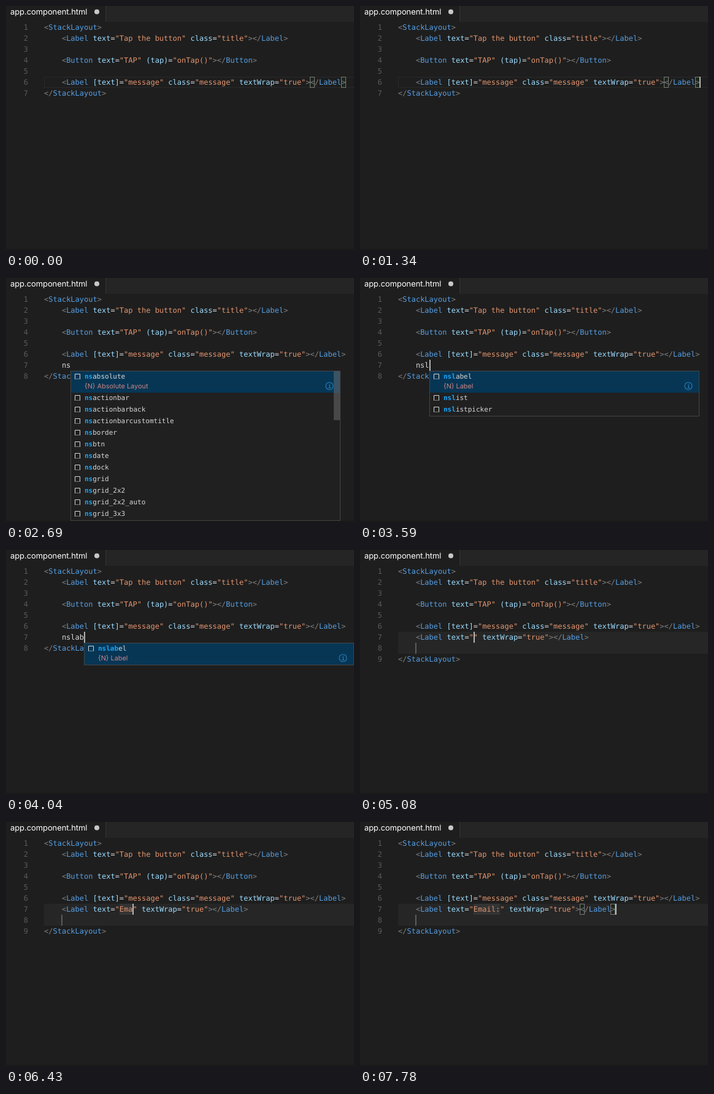
Recreate the animation shown at these times as an HTML page. Size 567 by 400 pixels, loop 8000 ms.

```html
<!DOCTYPE html>
<html lang="en">
<head>
<meta charset="utf-8">
<title>Editor snippet</title>
<style>
  html, body { margin: 0; width: 100%; height: 100%; overflow: hidden; background: #1e1e1e; }
  svg { display: block; width: 567px; height: 400px; }
  text { white-space: pre; text-rendering: geometricPrecision; }
  .code { font: 12px "DejaVu Sans Mono", monospace; }
  .item { font: 11px "DejaVu Sans Mono", monospace; fill: #d6d6d6; }
  .ui { font-family: Inter, sans-serif; }
  .num { fill: #5a5a5a; text-anchor: end; }
  .hit { fill: #18a3f6; font-weight: bold; }
</style>
</head>
<body>
<svg id="stage" viewBox="0 0 567 400"></svg>
<script>
const LOOP = 8000, LEFT = 62, TOP = 26, CHAR = 7.224, ROW = 18;
const COLORS = { punct: '#808080', tag: '#569fe4', attr: '#9cdcfe', op: '#d4d4d4', str: '#e2956f', plain: '#d8d8d8' };
const stage = document.getElementById('stage');

const HEAD = [
  '<StackLayout>',
  '    <Label text="Tap the button" class="title"></Label>',
  '',
  '    <Button text="TAP" (tap)="onTap()"></Button>',
  '',
  '    <Label [text]="message" class="message" textWrap="true"></Label>'
];
const TAIL = '</StackLayout>';
const ALL = ['absolute', 'actionbar', 'actionbarback', 'actionbarcustomtitle', 'border', 'btn',
  'date', 'dock', 'grid', 'grid_2x2', 'grid_2x2_auto', 'grid_3x3'].map(s => 'ns' + s);
const WIDE = { items: ALL, detail: '{N} Absolute Layout', col: 6, hit: 2, scroll: true };
const narrow = (typed, items) => ({ items, detail: '{N} Label', col: 4 + typed.length, hit: typed.length });

const ending = on => ({ lines: [...HEAD, TAIL], line: 6, col: 68, on, match: [60, 67], current: true });
const typing = (word, on, popup) =>
  ({ lines: [...HEAD, '    ' + word, TAIL], line: 7, col: 4 + word.length, on, popup });
const snippet = (value, on, atEnd) => {
  const row = `    <Label text="${value}" textWrap="true"></Label>`;
  return {
    lines: [...HEAD, row, '', TAIL], line: 7, on, value,
    col: atEnd ? row.length : 17 + value.length,
    match: atEnd && [row.length - 8, row.length - 1]
  };
};

const LABEL = ['nslabel'];
const STEPS = [
  [0, ending(false)], [300, ending(true)], [750, ending(false)], [1340, ending(true)],
  [1490, typing('', true)], [1940, typing('n', true)], [2090, typing('ns', true)],
  [2240, typing('ns', true, WIDE)], [2690, typing('ns', false, WIDE)], [2990, typing('nsl', true, WIDE)],
  [3440, typing('nsl', true, narrow('nsl', ['nslabel', 'nslist', 'nslistpicker']))],
  [3740, typing('nsla', true, narrow('nsla', LABEL))],
  [4040, typing('nslab', true, narrow('nslab', LABEL))],
  [4480, typing('nslab', false, narrow('nslab', LABEL))],
  [4930, typing('nslab', true, narrow('nslab', LABEL))],
  [5080, snippet('', true)], [5530, snippet('', false)], [5980, snippet('', true)],
  [6130, snippet('E', true)], [6280, snippet('Em', true)], [6430, snippet('Ema', true)],
  [6580, snippet('Email', true)], [7030, snippet('Email:', true)], [7480, snippet('Email:', false)],
  [7780, snippet('Email:', true, true)]
];

const xOf = col => LEFT + col * CHAR;
const yOf = line => TOP + (line - 1) * ROW;
const esc = s => s.replace(/&/g, '&amp;').replace(/</g, '&lt;').replace(/>/g, '&gt;');
const rect = (x, y, w, h, fill, extra = '') =>
  `<rect x="${x}" y="${y}" width="${w}" height="${h}" fill="${fill}" ${extra}/>`;
const frame = (x, y, w, h, fill, stroke) =>
  rect(x + .5, y + .5, w - 1, h - 1, fill, `stroke="${stroke}"`);
const span = (s, kind) => `<tspan fill="${COLORS[kind]}">${esc(s)}</tspan>`;

function paint(code) {
  if (!code.startsWith('<')) return span(code, 'plain');
  return code.replace(/(<\/?)(\w+)|("[^"]*")|(=)|(>)|([^\s=<>"]+)/g, (m, open, tag, str, op, close) =>
    open ? span(open, 'punct') + span(tag, 'tag') :
    span(m, str ? 'str' : op ? 'op' : close ? 'punct' : 'attr'));
}

function codeLine(text, i) {
  const code = text.trimStart(), y = yOf(i + 1) + 13;
  return `<text class="code num" x="36" y="${y}">${i + 1}</text>` +
    `<text class="code" x="${xOf(text.length - code.length)}" y="${y}">${paint(code)}</text>`;
}

function icon(x, y) {
  return `<path d="M${x + .5} ${y + 8}V${y + .5}H${x + 8.5}V${y + 8}" fill="none" stroke="#d8d8d8"/>` +
    `<path d="M${x} ${y + 8.5}h9" stroke="#d8d8d8" stroke-dasharray="1 1"/>`;
}

function popupBox({ items, detail, col, hit, scroll }) {
  const x = Math.round(xOf(col)), y = 152;
  const h = scroll ? 246 : 37 + (items.length - 1) * 19;
  let out = frame(x, y, 440, h, '#202021', '#454545') + rect(x + 1, y + 1, 438, 35, '#073655');
  items.forEach((name, i) => {
    const mid = i ? 177 + i * 19 : 161;
    out += icon(x + 7, mid - 4) + `<text class="item" x="${x + 23}" y="${mid + 4}">` +
      `<tspan class="hit">${name.slice(0, hit)}</tspan>${name.slice(hit)}</text>`;
  });
  out += `<text class="ui" x="${x + 23}" y="181" font-size="10.9" fill="#cb8583">${detail}</text>` +
    `<circle cx="${x + 422}" cy="177" r="6" fill="none" stroke="#2579b0" stroke-width="1.2"/>` +
    `<path d="M${x + 421} 176h1.5v4M${x + 420.5} 180.2h3.5M${x + 421.5} 173.8h1.4" fill="none" stroke="#2579b0" stroke-width="1.2"/>`;
  if (scroll) out += rect(x + 429, 153, 10, 80, '#797979', 'fill-opacity=".45"');
  return out;
}

const CHROME = rect(0, 0, 567, 400, '#1e1e1e') + rect(162, 0, 405, 26, '#252526') +
  rect(162, 0, 1, 26, '#343434') + rect(0, 398, 567, 2, '#191919') +
  '<text class="ui" x="7" y="14" font-size="13" letter-spacing="-.08" fill="#fff">app.component.html</text>' +
  '<circle cx="148" cy="9.5" r="4" fill="#c8c8c8"/>';

function draw(s) {
  const y = yOf(s.line);
  let out = CHROME;
  if (s.current) out += frame(LEFT, y, 510, ROW, 'none', '#292929');
  if (s.value !== undefined) {
    out += rect(LEFT, y, 505, 2 * ROW, '#262626') + rect(90, y + ROW, 2, ROW, '#5c5c5c');
    if (s.value) out += rect(xOf(17), y, s.value.length * CHAR, ROW, '#343434');
  }
  if (s.match) for (const col of s.match) out += frame(Math.floor(xOf(col)), y, 8, ROW, '#1c251c', '#7c7c7c');
  out += s.lines.map(codeLine).join('');
  if (s.on) out += rect(Math.round(xOf(s.col)), y, 2, ROW, '#b4b5b3');
  if (s.popup) out += popupBox(s.popup);
  stage.innerHTML = out;
}

let shown;
function tick() {
  const t = performance.now() % LOOP;
  const state = STEPS.findLast(([at]) => at <= t)[1];
  if (state !== shown) draw(shown = state);
  requestAnimationFrame(tick);
}
tick();
</script>
</body>
</html>
```
